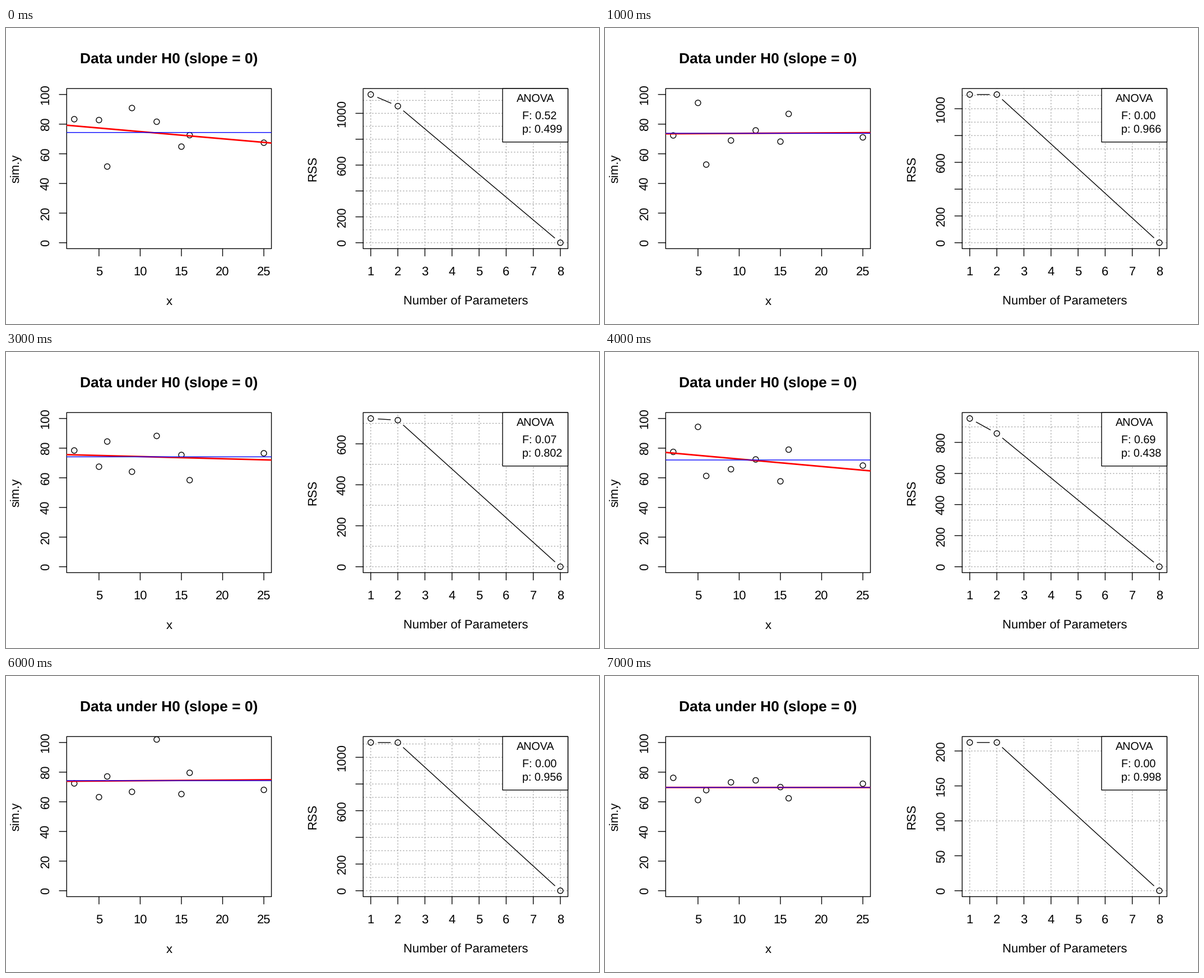
A matplotlib script for the animation above (8000 ms loop, 1058 by 529 pixels).

```python
import numpy as np
import matplotlib.pyplot as plt
from matplotlib.animation import FuncAnimation
from matplotlib.patches import Circle, Rectangle

plt.rcParams.update({
    "font.family": "Liberation Sans",
    "text.hinting": "no_hinting",
    "toolbar": "None",
})

W, H, DPI = 1058, 529, 64
PT = 72 / DPI            # points per pixel
FONT = 22                # base text size in pixels
LINE = 1.2 * FONT        # one margin line
STROKE = 1.375

# Plot regions in pixels
TOP, BOTTOM = 4.1 * LINE, H - 5.1 * LINE
LEFT, RIGHT = 4.1 * LINE, W / 2 - 2.1 * LINE
SHIFT = W / 2
PAD = (RIGHT - LEFT) * 0.04 / 1.08
SPAN_X = (RIGHT - LEFT) / 1.08
SPAN_Y = (BOTTOM - TOP) / 1.08
ZERO_Y = BOTTOM - SPAN_Y * 0.04

XS = np.array([2, 5, 6, 9, 12, 15, 16, 25])
# Each sample: heights of the points in pixels, F and p
SAMPLES = [
    ([163, 164.5, 247.6, 143, 167.5, 212, 191.5, 205], "0.52", "0.499"),
    ([192, 133.8, 244.1, 201, 183, 203, 153.5, 195.5], "0.00", "0.966"),
    ([139.2, 195.5, 140.4, 199, 201, 211, 209.5, 175], "1.34", "0.291"),
    ([176, 205, 160, 214, 150, 184, 229, 181], "0.07", "0.802"),
    ([178.5, 133.8, 221.5, 209.5, 192, 231.1, 174.5, 203], "0.69", "0.438"),
    ([187.5, 161.5, 183, 174, 152.5, 217.3, 139.8, 215.2], "0.65", "0.451"),
    ([192, 216.5, 179.5, 207, 113.5, 211, 173, 203.5], "0.00", "0.956"),
    ([182, 221.7, 204, 190, 186.5, 198.5, 218.5, 192.5], "0.00", "0.998"),
]

fig = plt.figure(figsize=(W / DPI, H / DPI), dpi=DPI, facecolor="white")
ax = fig.add_axes([0, 0, 1, 1])


def x_left(v):
    return LEFT + PAD + SPAN_X * (v - 2) / 23


def x_right(v):
    return SHIFT + LEFT + PAD + SPAN_X * (v - 1) / 7


def line(xs, ys, color="black", width=1, cap="round", **kw):
    ax.plot(xs, ys, color=color, lw=width * STROKE * PT, snap=False,
            solid_capstyle=cap, **kw)


def text(x, y, s, size=FONT, ha="center", **kw):
    ax.text(x, y, s, fontsize=size * PT, ha=ha, va="baseline",
            rotation_mode="anchor", zorder=6, **kw)


def box(x0, y0, x1, y1, fill="none", z=3):
    ax.add_patch(Rectangle((x0, y0), x1 - x0, y1 - y0, fc=fill, ec="black",
                           lw=STROKE * PT, joinstyle="round", snap=False,
                           zorder=z))


def ring(x, y):
    ax.add_patch(Circle((x, y), 0.225 * FONT, fc="none", ec="black",
                        lw=STROKE * PT, snap=False, zorder=3))


def grid_line(xs, ys):
    line(xs, ys, "#a9a9a9", ls=(0, (1, 3)), dash_capstyle="round", zorder=1)


def tick_x(x, label):
    line([x, x], [BOTTOM, BOTTOM + LINE / 2])
    text(x, BOTTOM + 1.8 * LINE, label)


def tick_y(edge, y, label):
    line([edge, edge - LINE / 2], [y, y])
    text(edge - 1.2 * LINE, y, label, rotation=90)


def axis_titles(edge, xlab, ylab):
    text(edge + (RIGHT - LEFT) / 2, BOTTOM + 3.8 * LINE, xlab)
    text(edge - 3.2 * LINE, (TOP + BOTTOM) / 2, ylab, rotation=90)


def draw_data(ys, fit):
    box(LEFT, TOP, RIGHT, BOTTOM)
    for v in range(5, 26, 5):
        tick_x(x_left(v), str(v))
    for v in range(0, 101, 20):
        tick_y(LEFT, ZERO_Y - SPAN_Y * v / 100, str(v))
    axis_titles(LEFT, "x", "sim.y")
    text((LEFT + RIGHT) / 2, 64, "Data under H0 (slope = 0)",
         size=1.2 * FONT, weight="bold")

    for x, y in zip(x_left(XS), ys):
        ring(x, y)
    ends = np.array([LEFT, RIGHT])
    line(ends, np.polyval(fit, ends), "red", 2, cap="butt", zorder=4)
    line(ends, [ys.mean()] * 2, "blue", cap="butt", zorder=5)


def draw_rss(rss):
    x0, x1 = SHIFT + LEFT, SHIFT + RIGHT
    scale = SPAN_Y / rss[0]
    top = rss[0] * 1.04

    for v in range(1, 9):
        grid_line([x_right(v)] * 2, [BOTTOM, TOP])
        tick_x(x_right(v), str(v))
    for v in np.arange(0, top, 100):
        grid_line([x0, x1], [ZERO_Y - v * scale] * 2)
    box(x0, TOP, x1, BOTTOM)

    step = 200 if top > 500 else 50
    roomy = step * scale > 50
    for k, v in enumerate(range(0, int(top) + 1, step)):
        shown = k == 0 or k % 2 or roomy
        tick_y(x0, ZERO_Y - v * scale, str(v) if shown else "")
    axis_titles(x0, "Number of Parameters", "RSS")

    dots = [np.array([x_right(n), ZERO_Y - v * scale])
            for n, v in zip((1, 2, 8), rss)]
    for p, q in zip(dots, dots[1:]):
        gap = (q - p) / np.hypot(*(q - p)) * LINE / 2
        line(*zip(p + gap, q - gap))
    for p in dots:
        ring(*p)


def draw_legend(f, p):
    size = 0.9 * FONT
    box(886, TOP, SHIFT + RIGHT, 203.8, "white", 5)
    text(944.3, 133, "ANOVA", size)
    text(921, 164, "F: " + f, size, "left")
    text(921, 188, "p: " + p, size, "left")


def draw(i):
    ax.clear()
    ax.set(xlim=(0, W), ylim=(H, 0))
    ax.axis("off")

    ys, f, p = SAMPLES[i]
    ys = np.array(ys)
    xs = x_left(XS)
    fit = np.polyfit(xs, ys, 1)
    unit = SPAN_Y / 100
    rss = [np.sum((ys - ys.mean()) ** 2) / unit ** 2,
           np.sum((ys - np.polyval(fit, xs)) ** 2) / unit ** 2, 0]
    draw_data(ys, fit)
    draw_rss(rss)
    draw_legend(f, p)
    return []


anim = FuncAnimation(fig, draw, frames=len(SAMPLES), interval=1000,
                     repeat=True, repeat_delay=0, blit=False)
plt.show()
```
